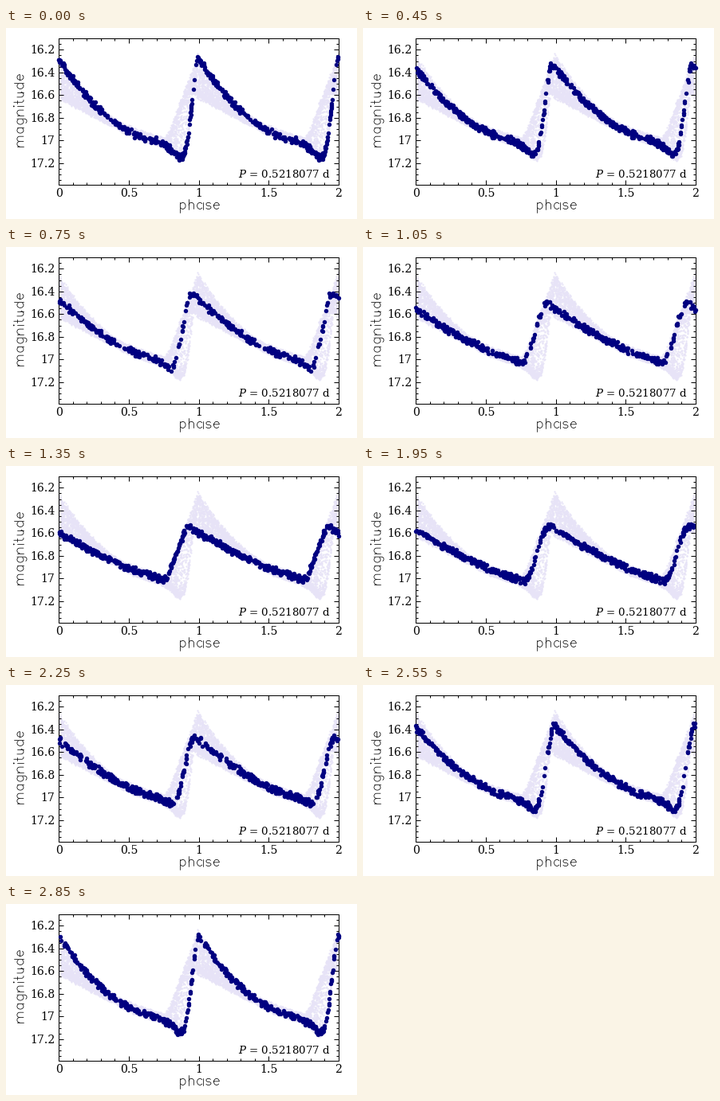
Recreate the animation shown at these times as a matplotlib script. Size 440 by 240 pixels, loop 3000 ms.

```python
import numpy as np
import matplotlib.pyplot as plt
from matplotlib.animation import FuncAnimation
from matplotlib.ticker import MultipleLocator

W, H, DPI = 440, 240, 80
PX = 72 / DPI                      # one pixel in points
LEFT, RIGHT, TOP, BOTTOM = 66, 417, 13, 197
BRIGHT, FAINT = 16.1, 17.39
FRAMES, STEP = 20, 150
NAVY, PALE = "#000080", "#e7e3f7"


def magnitude(phase, t):
    """Light curve at time t of the slow modulation cycle."""
    angle = 2 * np.pi * (t - .5) / FRAMES
    strength = ((1 + np.cos(angle)) / 2) ** 1.3
    lag = -.018 * np.sin(angle)    # the rise comes later while strengthening

    peak_mag = 16.555 - .285 * strength
    peak = .94 + .055 * strength + .8 * lag
    trough_mag = 17.008 + .144 * strength
    trough = .745 + .115 * strength + lag

    # Slow decline that flattens towards phase 0.75, then dips to the trough
    p = np.where(phase > peak, phase - 1, phase)
    power = 1.3 + .7 * strength
    height = (17 - peak_mag) / (1 + (1 - peak) / .75) ** power
    dip = np.clip((p - .65) / (trough - .65), 0, 1) ** 2
    fall = (17 - height * np.clip(1 - p / .75, 0, None) ** power
            + (trough_mag - 17) * dip)

    # Steep eased rise to the peak
    u = np.clip((p - trough) / (peak - trough), 0, 1) ** (1 + .5 * strength)
    rise = trough_mag + (peak_mag - trough_mag) * u * u * (3 - 2 * u)
    return np.where(p < trough, fall, rise)


def observe(t, count, spread, rng):
    phase = rng.uniform(0, 1, count)
    noise = np.clip(rng.normal(0, spread, count), -2 * spread, 2 * spread)
    mag = magnitude(phase, t) + noise
    return np.concatenate([phase, phase + 1]), np.tile(mag, 2)


# Single-stroke letters on a grid with an x-height of 14
def arc(cx, cy, rx, ry, start, end):
    a = np.radians(np.linspace(start, end, 16))
    return [(cx + rx * np.cos(b), cy + ry * np.sin(b)) for b in a]


def stem(x, low, high):
    return [(x, high), (x, low)]


def arch(x):
    return arc(x + 5.5, 8.5, 5.5, 5.5, 180, 0) + [(x + 11, 0)]


def turn(stroke):
    return [(19 - x, 14 - y) for x, y in stroke]


BOWL = arc(9, 7, 6, 7, 40, 320)
LETTERS = {                        # advance, strokes
    "a": (19, [BOWL, stem(15, 0, 14)]),
    "d": (19, [BOWL, stem(15, 0, 21)]),
    "e": (18, [[(3, 8)] + arc(9, 7, 6, 7, 8, 320)]),
    "g": (19, [BOWL, [(15, 14)] + arc(10, -2, 5, 5, 0, -145)]),
    "h": (19, [stem(4, 0, 21), arch(4)]),
    "i": (8, [stem(4, 0, 14), arc(4, 21, .8, .8, 0, 360)]),
    "m": (30, [stem(4, 0, 14), arch(4), arch(15)]),
    "n": (19, [stem(4, 0, 14), arch(4)]),
    "p": (19, [stem(4, -7, 14), turn(BOWL)]),
    "s": (17, [arc(8.5, 10.5, 5, 3.5, 25, 270)
               + arc(8.5, 3.5, 5.5, 3.5, 90, -155)]),
    "t": (12, [[(5, 21)] + arc(9, 4, 4, 4, 180, 285), [(2, 14), (9, 14)]]),
    "u": (19, [turn(arch(4)), stem(15, 0, 14)]),
}


def stroke_text(ax, word, x, y, scale=.58, upright=False):
    """Draw a word centred along its baseline at pixel (x, y)."""
    pen = -sum(LETTERS[c][0] for c in word) / 2
    for c in word:
        advance, strokes = LETTERS[c]
        for stroke in strokes:
            u, v = (np.array(stroke) + (pen, 0)).T * scale
            px, py = (x - v, y - u) if upright else (x + u, y - v)
            ax.plot(px, py, color="black", lw=.75 * PX,
                    solid_capstyle="round", solid_joinstyle="round")
        pen += advance


rng = np.random.default_rng(12)
nights = [observe(t, rng.integers(170, 300), .015, rng)
          for t in range(FRAMES)]
cloud = np.hstack([observe(t, 240, .018, rng)
                   for t in np.arange(0, FRAMES, .8)])

fig = plt.figure(figsize=(W / DPI, H / DPI), dpi=DPI, facecolor="white")
ax = fig.add_axes([LEFT / W, 1 - BOTTOM / H,
                   (RIGHT - LEFT) / W, (BOTTOM - TOP) / H])
ax.set(xlim=(0, 2), ylim=(FAINT, BRIGHT))
for axis, major, minor in ((ax.xaxis, .5, .1), (ax.yaxis, .2, .05)):
    axis.set_major_locator(MultipleLocator(major))
    axis.set_minor_locator(MultipleLocator(minor))
ax.tick_params(which="both", direction="in", top=True, right=True,
               labelbottom=False, labelleft=False, width=PX)
ax.tick_params(which="major", length=6 * PX)
ax.tick_params(which="minor", length=3 * PX)
for spine in ax.spines.values():
    spine.set_linewidth(PX)

ax.plot(*cloud, "o", ms=2.2 * PX, mew=0, color=PALE, zorder=1)
dots, = ax.plot([], [], "o", ms=5.4 * PX, mew=0, color=NAVY,
                clip_on=False, zorder=5)

# Labels are placed in pixels on a full-stage overlay
stage = fig.add_axes([0, 0, 1, 1])
stage.set(xlim=(0, W), ylim=(H, 0))
stage.axis("off")
plt.rcParams["mathtext.fontset"] = "dejavuserif"


def label(x, y, text, ha, size=14):
    stage.text(x, y, text, ha=ha, va="baseline", color="black",
               family="DejaVu Serif", fontsize=size * PX)


for value in np.arange(0, 2.1, .5):
    x = LEFT + .5 + value / 2 * (RIGHT - LEFT)
    label(x, 212, f"{value:g}", "center")
for value in np.arange(16.2, 17.3, .2):
    y = TOP + (value - BRIGHT) / (FAINT - BRIGHT) * (BOTTOM - TOP)
    label(61.5, y + 5, f"{value:.4g}", "right")
label(407.2, 188.5, "$P$ = 0.5218077 d", "right", 13.4)
stroke_text(stage, "phase", 242.5, 227.5)
stroke_text(stage, "magnitude", 22, 104, upright=True)


def draw(frame):
    dots.set_data(*nights[frame])
    return dots,


anim = FuncAnimation(fig, draw, frames=FRAMES, interval=STEP,
                     repeat=True, repeat_delay=0)
plt.show()
```
